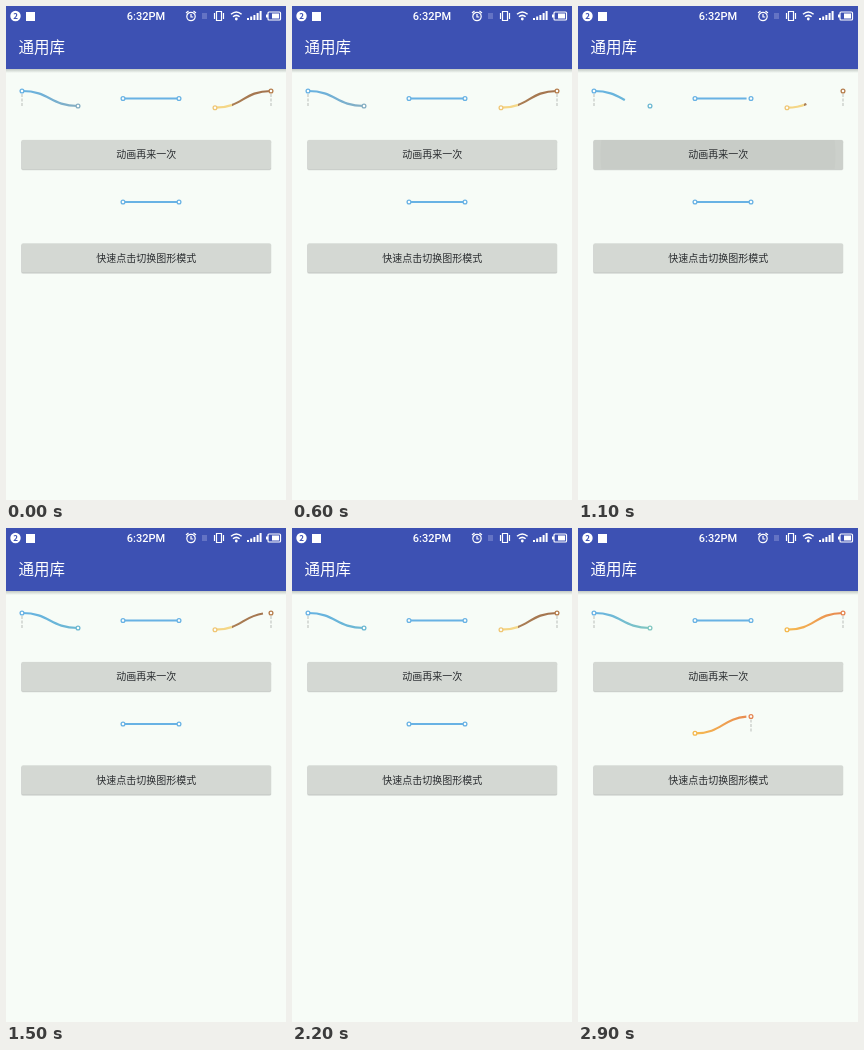
Write an HTML page that moves like this. It is 280x494 px and loops after 3 s.

```html
<!DOCTYPE html>
<html lang="zh">
<head>
<meta charset="utf-8">
<style>
  html, body { margin: 0; width: 100%; height: 100%; overflow: hidden; background: #f7fcf7; }
  svg { display: block; width: 280px; height: 494px; }
  text { font-family: "Noto Sans CJK SC", "Noto Sans CJK", sans-serif; }
  .label { font-size: 10px; font-weight: 500; fill: #292c2f; text-anchor: middle; }
  .clock { font: 500 11px Roboto, sans-serif; fill: #fff; text-anchor: middle; }
  .icon { fill: none; stroke: #fff; stroke-width: 1.2; }
</style>
</head>
<body>
<svg viewBox="0 0 280 494">
  <defs>
    <linearGradient id="fade" x2="0" y2="1">
      <stop stop-color="#8d9690" stop-opacity=".5"/><stop offset="1" stop-color="#8d9690" stop-opacity="0"/>
    </linearGradient>
    <linearGradient id="cool" gradientUnits="userSpaceOnUse" x1="16" x2="72">
      <stop stop-color="#66b2e2"/><stop id="coolEnd" offset="1"/>
    </linearGradient>
    <linearGradient id="muted" gradientUnits="userSpaceOnUse" x1="209" x2="265">
      <stop stop-color="#f5d380"/><stop offset=".31" stop-color="#f4d98b"/>
      <stop offset=".31" stop-color="#aa7e54"/><stop offset="1" stop-color="#a2724e"/>
    </linearGradient>
    <linearGradient id="warm" gradientUnits="userSpaceOnUse" x1="209" x2="265">
      <stop stop-color="#f6bb51"/><stop offset="1" stop-color="#e78750"/>
    </linearGradient>
    <linearGradient id="warmLow" href="#warm" x1="117" x2="173"/>
    <clipPath id="clip0"><rect x="15.5" y="134" width="249.5" height="29" rx="1.5"/></clipPath>
    <clipPath id="clip1"><rect x="15.5" y="237.5" width="249.5" height="29" rx="1.5"/></clipPath>
  </defs>
  <rect width="280" height="494" fill="#f7fcf7"/>
  <rect y="63" width="280" height="4" fill="url(#fade)"/>
  <rect width="280" height="63" fill="#3d51b3"/>
  <text x="12.5" y="47" font-size="15.5" fill="#fff">通用库</text>

  <circle cx="9.5" cy="10" r="5.2" fill="#fff"/>
  <text x="9.5" y="13" font-size="8" font-weight="bold" fill="#3d51b3" text-anchor="middle">2</text>
  <rect x="20" y="6" width="9" height="9" fill="#fff"/>
  <text class="clock" x="140" y="14">6:32PM</text>
  <g class="icon">
    <circle cx="185" cy="10.5" r="4.2"/>
    <path d="M185 8v3h2.2M180 7l2.5-2M190 7l-2.5-2M210.5 5.5h5v9h-5zM208.5 7v6M217.5 7v6"/>
    <path d="M225 8.3q5.3-4.6 10.6 0M227 10.8q3.3-2.8 6.6 0" stroke-width="1.5"/>
    <rect x="262" y="6" width="12.5" height="8" rx="1"/>
  </g>
  <rect x="196" y="7" width="5" height="6" fill="#6473c4"/>
  <circle cx="230.3" cy="13" r="1.4" fill="#fff"/>
  <path d="M241 14v-2h2v2zM244.2 14v-3.5h2V14zM247.4 14V9h2v5zM250.6 14V7h2v7zM253.6 14V5h2v9zM266 7.5h7v5h-7zM260 8.5h2v3h-2z" fill="#fff"/>
  <g id="buttons"></g>
  <g id="charts"></g>
</svg>
<script>
const LOOP = 3000, REPLAY = 850, SWITCH = 2270;
const $ = id => document.getElementById(id);
const clamp = v => Math.max(0, Math.min(1, v));

function button(i, y, label, age) {
  const box = `x="15.5" width="249.5" height="29" rx="1.5"`;
  const held = age >= 0 ? clamp((550 - age) / 200) : 0;
  return `<rect x="15" y="${y - .3}" width="250.5" height="30.8" rx="2" opacity=".07"/>
    <rect ${box} y="${y + .8}" opacity=".16"/>
    <rect ${box} y="${y}" fill="#d4d8d3"/>
    <g clip-path="url(#clip${i})" opacity="${held}">
      <rect ${box} y="${y}" fill="#ccd0cb"/>
      <circle cx="140" cy="${y + 14.5}" r="${Math.max(0, age * .47)}" fill="#c8ccc7"/>
    </g>
    <text class="label" x="140.2" y="${y + 18.3}">${label}</text>`;
}

const ring = (x, y, color) =>
  `<circle cx="${x}" cy="${y}" r="1.9" fill="#fcfefc" stroke="${color}" stroke-width="1.3"/>`;

function chart(x, y0, y1, stroke, from, to, progress) {
  const end = x + 56, mid = x + 28;
  const dropX = y0 < y1 ? x : end, top = Math.min(y0, y1);
  const drop = y0 === y1 ? "" :
    `<path d="M${dropX} ${top + 3}V${top + 16}" stroke="#b9bdb9" stroke-dasharray="3 1.5"/>`;
  return `${drop}<path d="M${x} ${y0}C${mid} ${y0} ${mid} ${y1} ${end} ${y1}" fill="none"
    stroke="${stroke}" stroke-width="2.2" pathLength="1" stroke-dasharray="${progress} 2"/>
    ${ring(x, y0, from)}${ring(end, y1, to)}`;
}

function draw(t) {
  const replay = duration => t < REPLAY ? 1 : clamp((t - REPLAY) / duration);
  const blue = "#68b2e4", vivid = t >= 2400;
  const coolEnd = t < REPLAY ? "#85aec2" : t < 2500 ? "#6db8d2" : "#80c7c0";
  const yellow = vivid ? "#f4b84d" : "#efc675";
  const orange = vivid ? "#e58450" : "#b57d4c";
  $("coolEnd").setAttribute("stop-color", coolEnd);

  $("buttons").innerHTML =
    button(0, 134, "动画再来一次", t - REPLAY) +
    button(1, 237.5, "快速点击切换图形模式", t - SWITCH);

  $("charts").innerHTML =
    chart(16, 85, 100, "url(#cool)", blue, coolEnd, replay(450)) +
    chart(117, 92.5, 92.5, blue, blue, blue, replay(270)) +
    chart(209, 101.7, 85, vivid ? "url(#warm)" : "url(#muted)", yellow, orange, replay(750)) +
    (t < SWITCH
      ? chart(117, 196, 196, blue, blue, blue, 1)
      : chart(117, 205.3, 188.5, "url(#warmLow)", "#f4b84d", "#e58450", clamp((t - SWITCH) / 680)));
}

function tick() {
  draw(Math.floor(performance.now() % LOOP / 100) * 100);
  requestAnimationFrame(tick);
}
tick();
</script>
</body>
</html>
```
